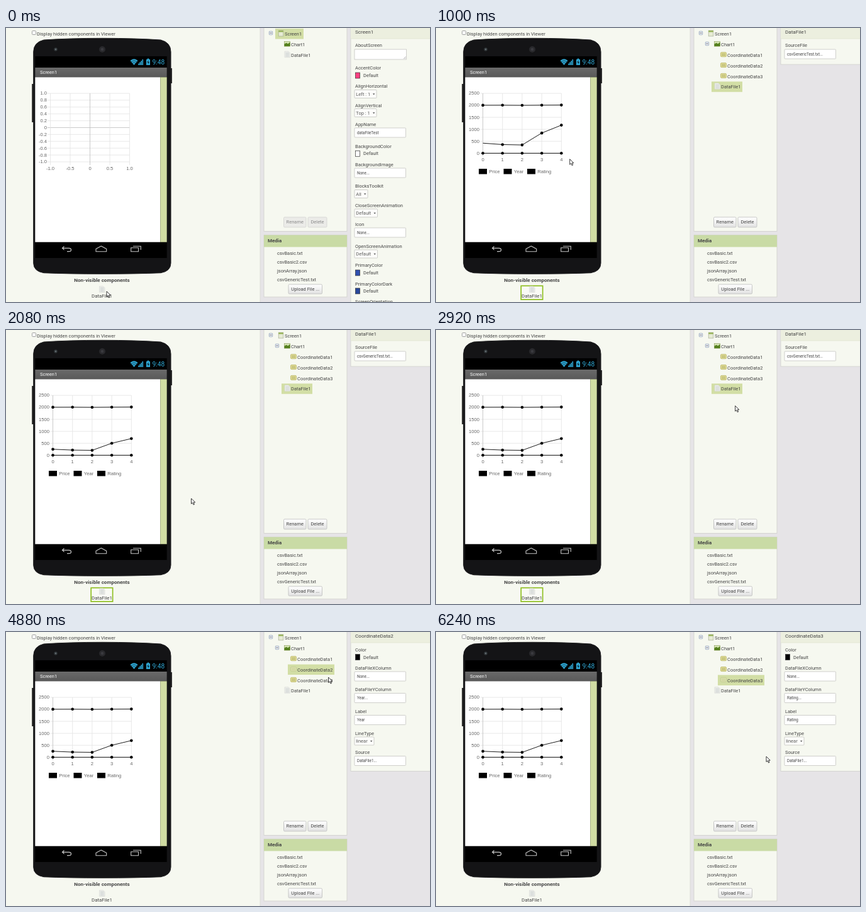
These frames come from a looping animation (674 by 436 pixels, 6.32 s). An HTML page:

```html
<!DOCTYPE html>
<html lang="en">
<head>
<meta charset="utf-8">
<title>Chart designer</title>
<style>
html, body { margin: 0; width: 100%; height: 100%; overflow: hidden; background: #e6e4e7; }
svg { display: block; width: 100vw; height: 100vh; }
text { font-family: Roboto, "Open Sans", sans-serif; font-size: 7.5px; fill: #444; }
.chart text { font-family: "Liberation Sans", Arial, sans-serif; font-size: 7.6px; fill: #666; }
</style>
</head>
<body>
<svg id="stage" viewBox="0 0 674 436" xmlns="http://www.w3.org/2000/svg">
  <defs>
    <linearGradient id="bar" x2="0" y2="1"><stop stop-color="#6a6a6a"/><stop offset="1" stop-color="#595959"/></linearGradient>
    <linearGradient id="button" x2="0" y2="1"><stop stop-color="#fff"/><stop offset="1" stop-color="#e2e2e2"/></linearGradient>
  </defs>
  <rect width="674" height="436" fill="#e6e4e7"/>
  <rect id="viewer" x="-2" y="-2" width="406" fill="#f6f8f0" stroke="#d6d6d2" stroke-width=".8"/>
  <g id="phone"></g>
  <g id="chart" class="chart"></g>
  <g id="tree"></g>
  <g id="media"></g>
  <g id="props"></g>
  <g id="file"></g>
  <path id="cursor" d="M0 0V8.6L2 6.8L3.5 10.1L5 9.4L3.5 6.2H6.2Z" fill="#fff" stroke="#222" stroke-width=".9" stroke-linejoin="round"/>
</svg>
<script>
const LOOP = 6320;
const DROP = 720, CHART_START = 880, CHART_TIME = 1000;
const PANEL = '#f6f8f0', SELECTED = '#d2dea5', STATUS = '#2fa8d5', NAV = '#c4c4c4';
const GRID = '#e3e3e3', AXIS = '#bdbdbd';
const $ = id => document.getElementById(id);

const rect = (x, y, w, h, fill, extra = '') =>
  `<rect x="${x}" y="${y}" width="${w}" height="${h}" fill="${fill}" ${extra}/>`;
const line = (x1, y1, x2, y2, color, w = .7) =>
  `<path d="M${x1} ${y1}L${x2} ${y2}" stroke="${color}" stroke-width="${w}"/>`;
const stroke = (d, color, w, extra = '') =>
  `<path d="${d}" fill="none" stroke="${color}" stroke-width="${w}" ${extra}/>`;
// y is the middle of the text line
const text = (x, y, s, style = '', anchor = 'start') =>
  `<text x="${x}" y="${y + 2.4}" text-anchor="${anchor}" style="${style}">${s}</text>`;

function button(x, y, w, h, label, enabled = true) {
  return rect(x, y, w, h, enabled ? 'url(#button)' : '#ebebe8', `rx="1.5" stroke="${enabled ? '#bbb' : '#d2d2d0'}" stroke-width=".8"`)
    + text(x + w / 2, y + h / 2, label, enabled ? '' : 'fill:#8a8a8a', 'middle');
}

function sheetIcon(x, y) {
  let s = `<path d="M${x - 4} ${y - 5}H${x + 2}L${x + 4.5} ${y - 2.5}V${y + 4.5}H${x - 4}Z" fill="#eceeea" stroke="#d3d6d2" stroke-width=".6"/>`;
  for (let i = 0; i < 4; i++) s += line(x - 2.5, y - 2.5 + i * 1.8, x + 3, y - 2.5 + i * 1.8, '#bcc2c3', .6);
  return s;
}

function drawPhone() {
  return text(49, 9.5, 'Display hidden components in Viewer')
    + rect(41.5, 4.5, 6, 6, '#fff', 'rx="1" stroke="#888" stroke-width=".8"')
    + rect(41.2, 89, 3, 61, '#222') + rect(261.5, 64, 2.4, 24, '#222')
    + '<path d="M43.700 38Q43.700 23 60 19Q100 16.300 153 16.300Q206 16.300 246 19Q262 23 262 38V374Q262 387 246 389.700Q206 391.300 153 391.300Q100 391.300 60 389.700Q43.700 387 43.700 374Z" fill="#141416" stroke="#1f1f21" stroke-width="1"/>'
    + '<circle cx="153" cy="34" r="5" fill="#29292c"/><circle cx="153" cy="34" r="2.300" fill="#3a3a3f"/>'
    + '<circle cx="79" cy="34" r="2.700" fill="#33393c"/><circle cx="79" cy="34" r="1.200" fill="#636c70"/>'
    + rect(46.3, 45, 209.4, 321, '#000')
    + rect(46.3, 63, 209.4, 15.3, 'url(#bar)') + text(54, 70.2, 'Screen1', 'fill:#fff')
    + rect(46.3, 78.3, 199, 262.4, '#fff') + rect(245.3, 78.3, 10.4, 262.4, '#d0dca3')
    + `<path d="M197.500 52Q203.500 46.500 209.500 52L203.500 59Z" fill="${STATUS}"/>`
    + stroke('M199 54Q203.500 50 208 54M201 56Q203.500 53.500 206 56', '#06202b', .7)
    + [0, 1, 2, 3].map(i => rect(210.2 + i * 2.1, 56.5 - i * 2.2, 1.6, 2.5 + i * 2.2, STATUS)).join('')
    + rect(223, 50, 6, 9, STATUS) + rect(224.6, 48.6, 2.8, 1.6, STATUS)
    + '<path d="M226.500 51L224.300 55H226L225.500 58L228 54H226.300Z" fill="#06202b"/>'
    + text(232.5, 55.3, '9:48', `fill:${STATUS};font-size:10.2px`)
    + stroke('M92.500 347.500L89.500 350.300L92.500 353M90 350.300H100Q103.500 350.300 103.500 353T100 355.700H97', NAV, 1.2)
    + stroke('M143 351.500L151.300 347L159.700 351.500V355.700H143Z', NAV, 1.1, 'stroke-linejoin="round"')
    + stroke('M198.700 349.700H210.500V355.700H198.700ZM202 347.300H214.300V353', NAV, 1.1)
    + text(152.5, 401.5, 'Non-visible components', 'font-size:8.05px;font-weight:bold', 'middle');
}

function drawMedia() {
  const files = ['csvBasic.txt', 'csvBasic2.csv', 'jsonArray.json', 'csvGenericTest.txt'];
  return rect(410, 329.5, 132, 98.5, PANEL, 'stroke="#cfcfcb" stroke-width=".8"')
    + rect(410, 329.5, 132, 19, '#c9dba5')
    + text(416, 339, 'Media', 'font-size:8px;font-weight:bold')
    + files.map((name, i) => text(431, 359 + i * 14, name)).join('')
    + button(449, 408, 53.5, 15, 'Upload File ...');
}

function drawEmptyChart() {
  let s = '';
  for (let i = 0; i <= 10; i++) {
    const y = 104 + i * 10.9, v = 1 - i / 5;
    s += line(66, y, 196.5, y, i === 5 ? AXIS : GRID, .8)
      + text(65, y, i === 5 ? '0' : v.toFixed(1), '', 'end');
  }
  ['-1.0', '-0.5', '0', '0.5', '1.0'].forEach((label, i) => {
    const x = 70.5 + i * 31.5;
    s += line(x, 104, x, 218, i === 2 ? AXIS : GRID, .8) + text(x, 224, label, '', 'middle');
  });
  return s;
}

function drawDataChart(t) {
  const left = i => 74.5 + i * 31.2, base = 199.3, height = 95.5;
  const progress = Math.min(1, (t - CHART_START) / CHART_TIME);
  const top = 2500 - 1700 * Math.pow(1 - progress, 4);
  const price = [250, 215, 205, 500, 695].map(v => base - height * v / top);
  const year = [2000, 2002, 1996, 2003, 2008].map(v => base - height * v / 2500);
  const rating = Array(5).fill(base);
  let s = '';
  for (let i = 0; i <= 5; i++) {
    const y = 104 + i * 19.06;
    s += line(70, y, 199.5, y, i === 5 ? AXIS : GRID, .8) + text(69, y, 2500 - i * 500, '', 'end');
  }
  for (let i = 0; i < 5; i++)
    s += line(left(i), 104, left(i), 204, i ? GRID : AXIS, .8) + text(left(i), 210, i, '', 'middle');
  [price, year, rating].forEach(row => {
    s += stroke('M' + row.map((y, i) => `${left(i)} ${y}`).join('L'), '#000', .9);
    row.forEach((y, i) => {
      if (row !== price || i || t > 1440) s += `<circle cx="${left(i)}" cy="${y}" r="2.3"/>`;
    });
  });
  [[68, 'Price'], [107.5, 'Year'], [145, 'Rating']].forEach(([x, label]) => {
    s += rect(x, 224, 13, 8.5, '#000') + text(x + 16.3, 228.3, label);
  });
  return s;
}

function expander(x, y) {
  return rect(x - 2.7, y - 2.7, 5.4, 5.4, '#f4f7fb', 'rx=".7" stroke="#8495b0" stroke-width=".7"')
    + line(x - 1.6, y, x + 1.6, y, '#334', .8);
}

const icons = {
  screen: (x, y) => rect(x - 3.8, y - 4.5, 7.6, 9, '#e7ecd4', 'stroke="#a5ab94" stroke-width=".7"')
    + rect(x - 3.8, y - 4.5, 7.6, 2.5, '#98b35c'),
  chart: (x, y) => rect(x - 4.7, y - 3.8, 9.4, 7.6, '#d5e4b4', 'stroke="#8a9a5a" stroke-width=".6"')
    + `<path d="M${x - 4.5} ${y + 3.6}V${y}L${x - 1} ${y - 1.5}L${x + 1} ${y}L${x + 4.5} ${y - 2.5}V${y + 3.6}Z" fill="#55801e"/>`,
  file: sheetIcon,
  data: (x, y, pale) => rect(x - 4.5, y - 3.5, 9, 7, pale ? '#dbe0ae' : '#e4dd9a', `rx="1.5" stroke="${pale ? '#c2cc92' : '#b7b563'}" stroke-width=".8"`)
    + line(x - 3, y - 1, x + 3, y - 1, pale ? '#c0c98e' : '#8f9a4a') + line(x - 3, y + 1.2, x + 3, y + 1.2, pale ? '#c0c98e' : '#8f9a4a')
};

function drawTree(selected) {
  const full = selected !== 'Screen1';
  const rows = [['Screen1', 'screen', 437, 443], ['Chart1', 'chart', 447, 453]];
  if (full) for (let i = 1; i <= 3; i++) rows.push(['CoordinateData' + i, 'data', 457, 463]);
  rows.push(['DataFile1', 'file', 447, 453]);
  const widths = { Screen1: 45, DataFile1: 49 };
  let s = rect(410, -2, 132, 325.5, PANEL, 'stroke="#cfcfcb" stroke-width=".8"') + expander(421, 8);
  if (full) s += expander(431, 25);
  rows.forEach(([name, icon, ix, tx], i) => {
    const y = 9.5 + i * 16.85, on = name === selected;
    if (on) s += rect(ix - 9, y - 8.5, widths[name] || 74, 16.5, SELECTED);
    s += icons[icon](ix, y - 1, on) + text(tx, y + .3, name);
  });
  return s + button(441.5, 301, 35.5, 16, 'Rename', full) + button(480, 301, 30, 16, 'Delete', full);
}

const field = (y, value) => rect(554, y, 81.5, 15, '#fff', 'rx="1" stroke="#c4c4c0" stroke-width=".8"')
  + text(558, y + 7.4, value, 'font-size:6.3px');
const swatch = (y, color) => rect(555.5, y, 7, 9, color, 'stroke="#333" stroke-width=".7"')
  + text(568, y + 4.6, 'Default');
const select = (y, value, w) => rect(554, y, w, 13, '#fcfcfa', 'rx="1" stroke="#c4c4c0" stroke-width=".8"')
  + text(556.3, y + 6.6, value, 'fill:#5c5c5c')
  + `<path d="M${554 + w - 6} ${y + 5.7}h3.4l-1.7 2.4z" fill="#555"/>`;

function drawProps(selected) {
  const label = (y, s) => text(555, y, s);
  let body, bottom;
  if (selected === 'Screen1') {
    bottom = 440;
    body = label(28, 'AboutScreen') + rect(554, 34, 82.5, 16, '#fff', 'stroke="#c4c4c0" stroke-width=".8"')
      + stroke('M632 49L635.500 45.500M634 49L635.500 47.500', '#888', .6)
      + label(64, 'AccentColor') + swatch(71, '#ff4081')
      + label(93, 'AlignHorizontal') + select(98.5, 'Left : 1', 35)
      + label(123.5, 'AlignVertical') + select(128.5, 'Top : 1', 35)
      + label(153.7, 'AppName') + field(159, 'dataFileTest')
      + label(188.2, 'BackgroundColor') + swatch(195.3, '#fff')
      + label(217.6, 'BackgroundImage') + field(223, 'None...')
      + label(252, 'BlocksToolkit') + select(257.5, 'All', 21)
      + label(282.5, 'CloseScreenAnimation') + select(288, 'Default', 36.5)
      + label(313, 'Icon') + field(318, 'None...')
      + label(347.5, 'OpenScreenAnimation') + select(353, 'Default', 36.5)
      + label(378, 'PrimaryColor') + swatch(385, '#3050b0')
      + label(407.5, 'PrimaryColorDark') + swatch(414, '#28489c')
      + label(436, 'ScreenOrientation');
  } else if (selected === 'DataFile1') {
    bottom = 58;
    body = label(28, 'SourceFile') + field(34, 'csvGenericTest.txt...');
  } else {
    bottom = 221.5;
    const column = { 1: 'Price', 2: 'Year', 3: 'Rating' }[selected.slice(-1)];
    body = label(28.5, 'Color') + swatch(35.5, '#000')
      + label(57.5, 'DataFileXColumn') + field(63, 'None...')
      + label(92, 'DataFileYColumn') + field(97.5, column + '...')
      + label(127, 'Label') + field(132.5, column)
      + label(161.5, 'LineType') + select(167, 'linear', 31)
      + label(191.5, 'Source') + field(197.5, 'DataFile1...');
  }
  return rect(548, -2, 130, bottom + 2, PANEL, 'stroke="#cfcfcb" stroke-width=".8"')
    + rect(548, -2, 130, 19, '#ecefdf') + line(548, 17, 674, 17, '#dde1cf')
    + text(555, 6.7, selected, 'font-size:8.1px') + body;
}

function drawFile(selected, dragging) {
  return (selected ? rect(135.2, 410.3, 34.4, 21.8, '#f9faf5', 'stroke="#8fbf21" stroke-width="1.7"') : '')
    + sheetIcon(152.5, 416)
    + text(152.5, 427, 'DataFile1', `font-size:7.8px;fill:${dragging ? '#222' : '#444'}`, 'middle');
}

// [time, x, y]
const path = [
  [40, 160, 419], [600, 147, 161], [760, 147, 161], [1280, 294.5, 268], [2640, 294.5, 268],
  [2920, 475.5, 121], [3180, 499, 43], [3320, 499, 43], [3660, 503, 66], [3860, 503, 66],
  [4040, 504, 58], [4440, 505, 56], [4860, 512.5, 72], [5260, 512.5, 72], [5780, 535, 172], [6200, 525, 198]
];

// Monotone cubic through the path points
function slope(i, axis) {
  const a = path[i - 1], b = path[i], c = path[i + 1];
  if (!a || !c) return 0;
  const p = (b[axis] - a[axis]) / (b[0] - a[0]), q = (c[axis] - b[axis]) / (c[0] - b[0]);
  return p * q > 0 ? 2 * p * q / (p + q) : 0;
}

function cursorAt(t) {
  const last = path.length - 1;
  if (t <= path[0][0]) return path[0].slice(1);
  if (t >= path[last][0]) return path[last].slice(1);
  const i = path.findIndex(p => p[0] > t) - 1, a = path[i], b = path[i + 1];
  const d = b[0] - a[0], u = (t - a[0]) / d, ease = u * u * (3 - 2 * u);
  return [1, 2].map(k => {
    const from = slope(i, k) * d, to = slope(i + 1, k) * d;
    return a[k] + (b[k] - a[k]) * ease + u * (1 - u) * ((1 - u) * from - u * to);
  });
}

const selectionAt = t => t < DROP ? 'Screen1' : t < 3320 ? 'DataFile1'
  : 'CoordinateData' + (t < 4080 ? 1 : t < 5240 ? 2 : 3);

const drawn = {};
function update(id, key, draw) {
  if (drawn[id] === key) return;
  drawn[id] = key;
  $(id).innerHTML = draw();
}

function render(t) {
  const selected = selectionAt(t), [x, y] = cursorAt(t);
  const dragging = t >= 120 && t < DROP;
  update('tree', selected, () => drawTree(selected));
  update('props', selected, () => drawProps(selected));
  update('chart', t < CHART_START ? 'empty' : Math.min(t, CHART_START + CHART_TIME),
    () => t < CHART_START ? drawEmptyChart() : drawDataChart(t));
  update('file', selected + dragging, () => drawFile(selected === 'DataFile1', dragging));
  $('file').setAttribute('transform', dragging ? `translate(${(x - 160) * .95} ${(y - 419) * .988})` : '');
  $('viewer').setAttribute('height', dragging ? 415.5 : 442);
  $('cursor').setAttribute('transform', `translate(${x} ${y})`);
}

$('phone').innerHTML = drawPhone();
$('media').innerHTML = drawMedia();
const start = performance.now();
function tick() {
  render((performance.now() - start) % LOOP);
  requestAnimationFrame(tick);
}
tick();
</script>
</body>
</html>
```
